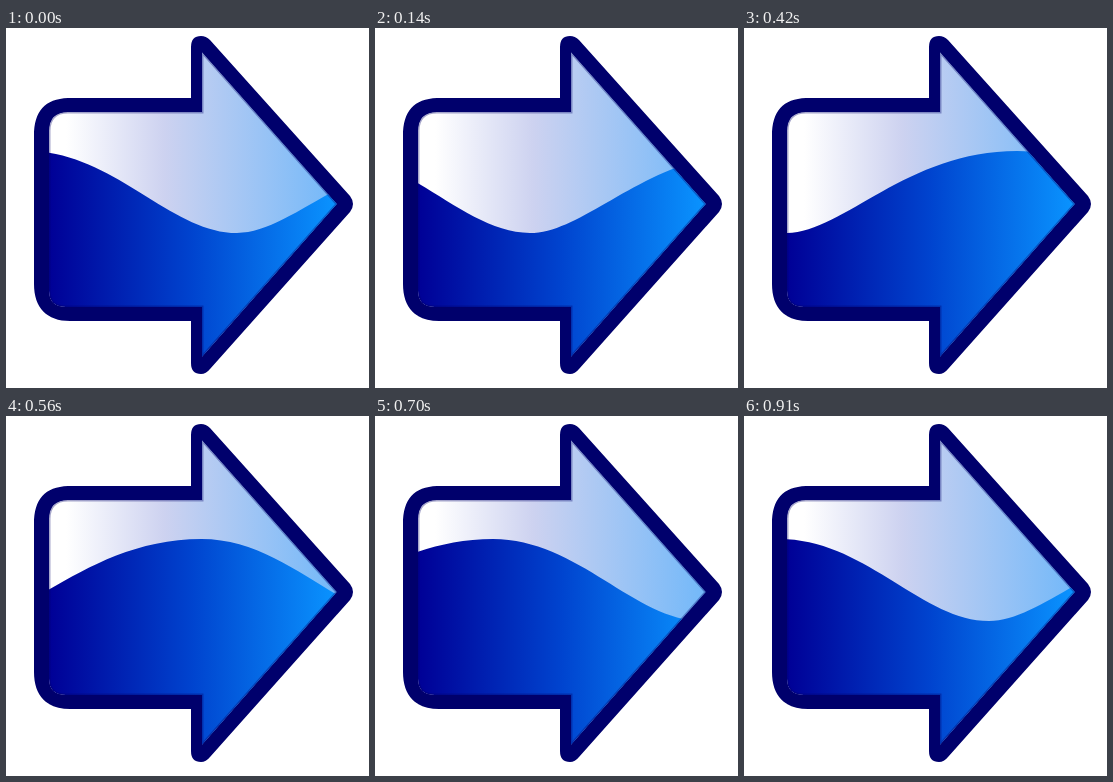
An HTML page that plays this animation: 363x360 px, repeating every 0.98 s.

```html
<!DOCTYPE html>
<html lang="en">
<head>
<meta charset="utf-8">
<title>Arrow with a wave</title>
<style>
  html, body { margin: 0; width: 100%; height: 100%; overflow: hidden; background: #fff; }
  svg { display: block; }
</style>
</head>
<body>
<svg width="363" height="360" viewBox="0 0 363 360">
  <defs>
    <linearGradient id="sky" gradientUnits="userSpaceOnUse" x1="43" y1="0" x2="331" y2="0">
      <stop offset=".06" stop-color="#fff"/>
      <stop offset=".4" stop-color="#cdd2f0"/>
      <stop offset="1" stop-color="#72b8f9"/>
    </linearGradient>
    <linearGradient id="sea" gradientUnits="userSpaceOnUse" x1="43" y1="0" x2="331" y2="0">
      <stop offset="0" stop-color="#000096"/>
      <stop offset=".5" stop-color="#0044cf"/>
      <stop offset="1" stop-color="#0a94ff"/>
    </linearGradient>
    <path id="inner" d="M196 24 L331 176 L196 329 V279 H60 Q43 279 43 263 V103 Q43 84 62 84 H196 Z"/>
    <clipPath id="clip"><use href="#inner"/></clipPath>
    <clipPath id="water"><path id="wave"/></clipPath>
  </defs>
  <path fill="#00006c" d="M185 70 V19 Q185 8 195 8 Q200 8 204 12 L344 168 Q350 176 344 184
    L204 341 Q200 346 195 346 Q185 346 185 335 V293 H64 C41 293 28 280 28 256
    V108 C28 83 39 71 62 70 Z"/>
  <g clip-path="url(#clip)">
    <use href="#inner" fill="url(#sky)"/>
    <g clip-path="url(#water)"><use href="#inner" fill="url(#sea)"/></g>
    <use href="#inner" fill="none" stroke="#00006c" stroke-opacity=".35" stroke-width="3"/>
  </g>
</svg>
<script>
const STEP = 70, STEPS = 14;

// One wave length (440 px): crest down to trough, then a longer rise
const FALL = 'c85 0 142 82 209 82';
const RISE = 'c57 0 120 -82 231 -82';

// [step, distance travelled to the left]
const KEYS = [[0, 0], [4, 152], [6, 189], [10, 344], [13, 426], [14, 440]];

function travel(step) {
  const k = KEYS.findIndex(([s]) => s > step);
  const [s0, x0] = KEYS[k - 1], [s1, x1] = KEYS[k];
  return x0 + (x1 - x0) * (step - s0) / (s1 - s0);
}

const wave = document.getElementById('wave');
wave.setAttribute('d', 'M22 360V123' + (FALL + RISE).repeat(2) + 'V360Z');

const start = performance.now();

function draw(now) {
  const step = Math.floor(Math.max(0, now - start) / STEP) % STEPS;
  wave.setAttribute('transform', `translate(${-travel(step)} 0)`);
  requestAnimationFrame(draw);
}
draw(start);
</script>
</body>
</html>
```
